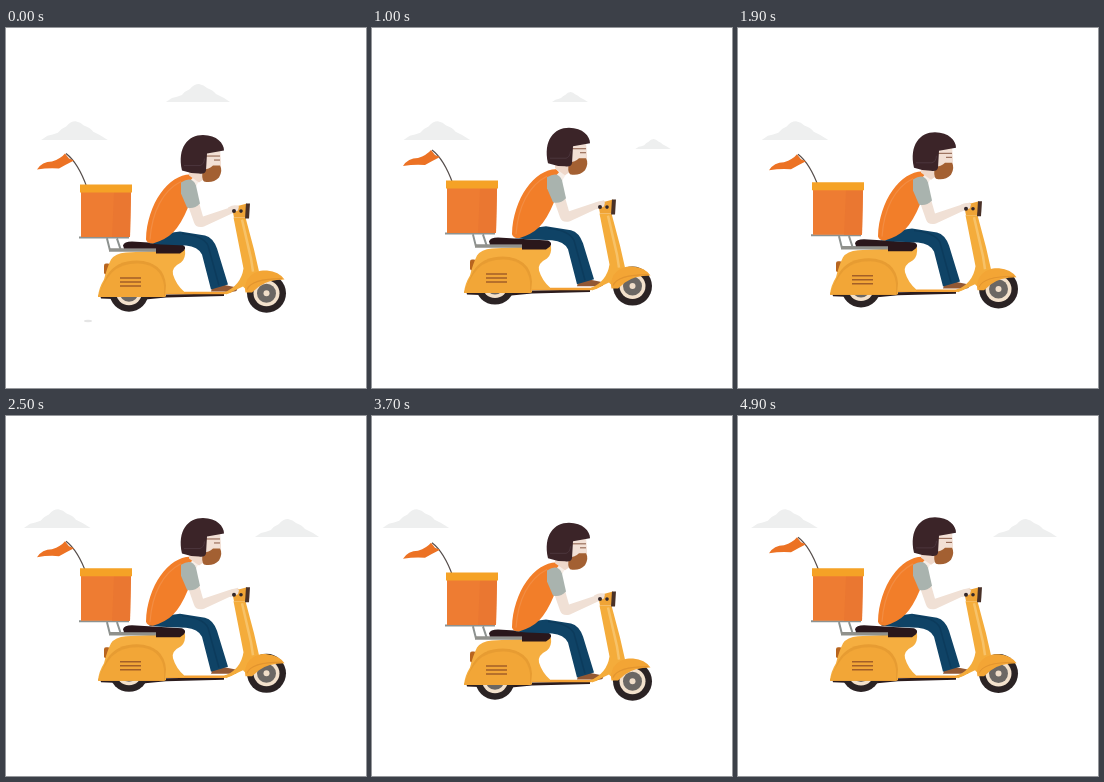
An HTML page that plays this animation: 360x360 px, repeating every 5000 ms.

```html
<!DOCTYPE html>
<html lang="en">
<head>
<meta charset="utf-8">
<title>Scooter delivery</title>
<style>
  html, body { margin: 0; height: 100%; overflow: hidden; background: #fff; }
  svg { display: block; width: 100vw; height: 100vh; }
</style>
</head>
<body>
<svg viewBox="0 0 360 360">
  <defs>
    <path id="cloud" fill="#eeefef" d="M-32 0L-26-4Q-21-5-16-7Q-13-11-8-13Q-4-18 1-18Q6-17 9-14Q15-12 18-8Q25-5 32 0Z"/>
    <g id="wheel">
      <circle r="19.5" fill="#2b2324"/>
      <circle r="13" fill="#f3e1cc"/>
      <circle r="9.5" fill="#6b6764"/>
      <circle r="3" fill="#efddc9"/>
    </g>
  </defs>

  <use href="#cloud" id="left"/>
  <use href="#cloud" id="top"/>
  <use href="#cloud" id="right"/>
  <ellipse id="dust" cx="82" cy="293" rx="4" ry="1.2" fill="#e5e5e5"/>

  <g id="chassis">
    <path d="M94 267H160L218 266V268.500L160 270L134 272.500L95 271Z" fill="#2b1b1c"/>
  </g>

  <g id="wheels">
    <use href="#wheel" x="123" y="265"/>
    <use href="#wheel" x="260.500" y="266"/>
  </g>

  <g id="flag">
    <path d="M60 126Q72 135 81 160" fill="none" stroke="#554d4b" stroke-width="1.2"/>
    <path d="M31 142Q36 134 46 134Q55 131 59 126L63 131L68 133Q60 137 53 141Q43 140 31 142Z" fill="#ec7224"/>
  </g>

  <g id="scooter">
    <!-- rack and box -->
    <path d="M73 210H123M101 211L104 223M111 211L115 223" fill="none" stroke="#8d9290" stroke-width="2"/>
    <path d="M75 163H125L124 209.500H75Z" fill="#ee7c32"/>
    <path d="M108 165H125L124 209.500H106Z" fill="#ea7731"/>
    <path d="M74 157H126V165H74Z" fill="#f5a226"/>
    <!-- floor -->
    <path d="M160 265.500H218Q231 264 238 251" fill="none" stroke="#f3a033" stroke-width="2.500"/>
    <!-- rear body -->
    <rect x="98" y="236" width="6" height="11" rx="2" fill="#b8651f"/>
    <path d="M92 269Q93 260 98 252Q101 240 105 232Q109 226 120 225L179 222Q180 231 175 235Q165 240 167 247Q170 257 178 264V266H160V269Z" fill="#f5ae40"/>
    <path d="M92 269.500Q96 258 101 248Q110 233 131 233Q158 234 160 258L159 269.500Z" fill="#e79c32"/>
    <path d="M92 269.500Q97 255 106 245Q115 236 132 236Q155 237 158 258V269.500Z" fill="#f2a637"/>
    <path d="M114 250.500H135M114 254.500H135M114 258.500H135" stroke="#a35f28" stroke-width="1.500"/>
    <path d="M103 222.500H150" stroke="#90918c" stroke-width="3.500"/>
    <path d="M117 218Q118 214 126 214L176 217Q181 219 178 223L174 226H150V221L118 221Z" fill="#2a171b"/>
  </g>

  <g id="rider">
    <path d="M205 264Q206 258 216 257L231 260Q232 264 228 264Z" fill="#925834"/>
    <path d="M143 216Q154 205 174 204L199 208Q207 210 211 221L222 257L205 262L196 227Q192 219 180 218L155 217Z" fill="#0f4366"/>
    <path d="M176 206Q197 208 202 218L213 258" fill="none" stroke="#0c3b5c" stroke-width="1.500"/>
    <path d="M177 152Q181 145 190 146L194 152L188 162Z" fill="#f7eee7"/>
    <path d="M184 147C163 147 141 176 140 212Q141 216 147 216Q160 212 167 205Q175 197 182 180L178 160L187 150Z" fill="#f27e29"/>
    <path d="M175 154C157 163 146 184 144 212" fill="none" stroke="#f28d43" stroke-width="1.200"/>
    <path d="M182 178L193 175L197 189L224 180L232 178L234 184L226 186L198 199Q190 201 188 195Z" fill="#f0e0d5"/>
    <path d="M175 155Q186 148 190 158L194 176Q188 182 181 180L175 166Z" fill="#a9b3ae"/>
  </g>

  <g id="head">
    <path d="M183 140H199V151L193 155L183 148Z" fill="#efd8ca"/>
    <path d="M198 124L214 122L215 134V140L198 144Z" fill="#f2e0d5"/>
    <path d="M197 142Q203 142 207 138L214 138Q217 143 213 150Q207 156 198 154Q195 151 197 142Z" fill="#a36032"/>
    <path d="M200 128.500H214M208 132.500H214" fill="none" stroke="#8a5a45"/>
    <path d="M176 143C171 120 182 107.500 197 107.500C211 107.500 218 116 218 123L201 126L200 143Q199 147 193 146Q184 146 176 143Z" fill="#3b2428"/>
    <path d="M178 138H194Q198 137 198.500 131" fill="none" stroke="#4b353c"/>
  </g>

  <g id="front">
    <path d="M227.500 190H239.500L248 222L253 244L242 264L237 259L220 267L218 265Q235 258 237.500 241Z" fill="#f4ac3b"/>
    <path d="M236 192L245 231L247 244" fill="none" stroke="#f7c268" stroke-width="2.500"/>
    <path d="M239.500 265C237 250 249 242 261 243Q273 244 278.500 252Q262 252 253 259L246 265Z" fill="#f3a535"/>
    <path d="M241 262Q245 251 276 251" fill="none" stroke="#e3952f" stroke-width="1.200"/>
    <path d="M226 180L241 176V190H228Z" fill="#efa437"/>
    <path d="M240 176H244L243 191H239Z" fill="#493128"/>
    <path d="M222 180Q229 176 233 179L232 183L224 186Z" fill="#f0e0d5"/>
    <g fill="#33272a"><circle cx="228" cy="183.500" r="2"/><circle cx="235" cy="183.500" r="1.800"/></g>
  </g>
</svg>
<script>
const $ = id => document.getElementById(id);
const LOOP = 5000, STEP = 100;

// 0..1..0 wave, n cycles per loop
const wave = (u, n) => (1 - Math.cos(2 * Math.PI * n * u)) / 2;

// linear interpolation through [time, value] pairs
function ramp(t, keys) {
  let [t0, v0] = keys[0];
  for (const [t1, v1] of keys) {
    if (t < t1) return t1 === t0 ? v1 : v0 + (v1 - v0) * Math.max(0, (t - t0) / (t1 - t0));
    [t0, v0] = [t1, v1];
  }
  return v0;
}

const topSize = [[0, 1], [.6, 1], [1, .56], [1.4, 0], [2.5, 0], [2.7, 1], [3, 1], [3.4, 0]];
const rightSize = [[.7, 0], [1, .55], [1.3, 1], [1.6, 1], [1.9, 0], [2.3, 1], [2.7, 1], [3.1, 0], [4.4, 0], [4.7, 1]];

function place(id, x, y, scale = 1) {
  $(id).setAttribute("transform", `translate(${x} ${y}) scale(${scale})`);
}

function draw(ms) {
  const t = ms / 1000, u = ms / LOOP;
  const bounce = -.4 - 4.4 * wave(u, 23);
  place("wheels", 0, bounce * 1.8);
  for (const id of ["chassis", "scooter", "front"]) place(id, 0, bounce);
  place("rider", 0, bounce * 1.3);
  place("head", 0, bounce * 1.15 - 3 * wave(u, 8));
  place("flag", 0, bounce + 4 * wave(u, 1) ** 2);

  place("left", 56 + 12.500 * Math.cos(Math.PI * t / 4), 112, 1.04);
  place("top", 192 + 6 * Math.min(t, 1), 74, ramp(t, topSize));
  place("right", 281 + Math.max(0, t - 2.5) * 2.5, 121, ramp(t, rightSize));
  $("dust").style.display = ms < STEP ? "" : "none";
}

const start = performance.now();
function tick() {
  const ms = (performance.now() - start) % LOOP;
  draw(Math.floor(ms / STEP) * STEP);
  requestAnimationFrame(tick);
}
tick();
</script>
</body>
</html>
```
